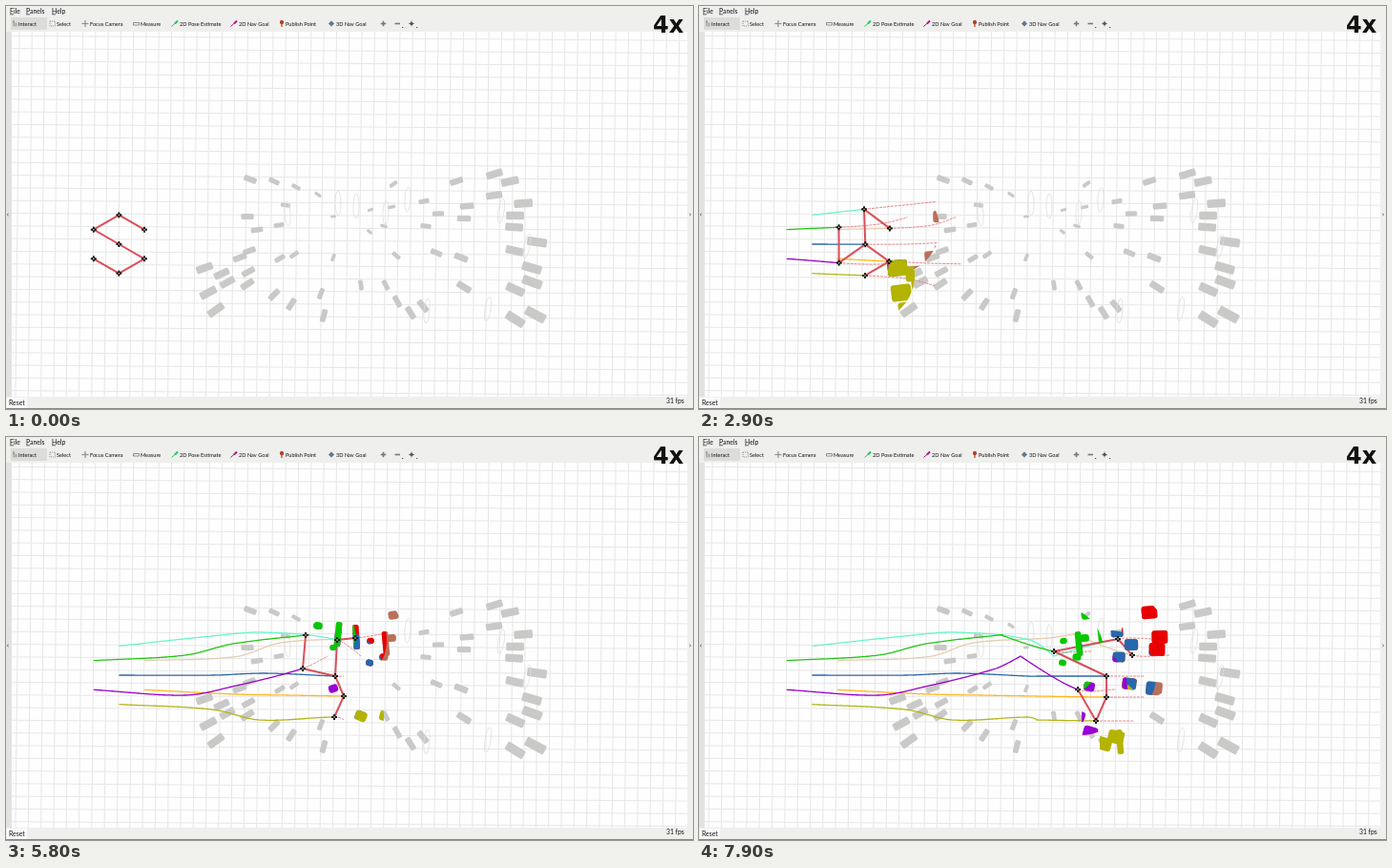
An HTML page with a canvas that plays this animation: 720 px wide and 423 px high, repeating every 8 s.

```html
<!DOCTYPE html>
<html>
<head>
<meta charset="utf-8">
<style>
html, body { margin: 0; width: 720px; height: 423px; overflow: hidden; }
canvas { display: block; }
</style>
</head>
<body>
<canvas id="stage" width="720" height="423"></canvas>
<script>
const LOOP = 8000, START = 1990, GOAL = 6250, PAUSE = 400, HORIZON = 1250;
const TIMES = [START, 3600, 4500, 5800, GOAL, 7500, 8300];
const REST = TIMES.indexOf(GOAL), RANGE = 48;
const PANEL = '#efefee', GRID = '#e7e7e8', GHOST = '#c9c9c8';

// Starting slot on a lattice, then the points passed at the inner TIMES.
function robot(trail, sight, col, row, ...points) {
  const [x, y] = points[points.length - 1];
  return { trail, sight, route: [[118.4 + 26.6 * col, 250 + 15.3 * row], ...points, [x + 40, y]] };
}

// Listed in painting order: later robots colour over earlier ones.
const robots = {
  E: robot('#ffb820', null, 1, 1, [241, 270], [295, 271], [354, 272], [354, 272], [427, 273]),
  C: robot('#e5cdb0', '#b9705a', 1, -1, [241, 230.5], [288, 216], [366, 211], [393, 207], [454, 229]),
  A: robot('#68f5cc', '#e80000', 0, -2, [215, 209], [269, 205], [347, 213], [372, 230], [439, 212]),
  D: robot('#2c67aa', '#2468ad', 0, 0, [217, 250], [271, 248], [345, 251], [354, 251], [427, 251]),
  G: robot('#b5b51c', '#b3b300', 0, 2, [216, 286], [266, 297], [344, 294], [354, 297], [416, 298]),
  F: robot('#9a00c8', '#9a00d4', -1, 1, [188, 271], [237, 262], [311, 243], [337, 230], [397, 265]),
  B: robot('#22c514', '#08c800', -1, -1, [188, 229], [238, 217], [314, 208], [317, 208], [372, 225])
};
const fleet = Object.values(robots);
const CHAIN = ['CA', 'AB', 'BD', 'DE', 'EG', 'GF'];
const FORK = ['CA', 'AD', 'DF', 'FB', 'DE', 'EG'];

const boxes = [
  [256,182], [281,184], [304,190], [327,198], [253,221], [263,235], [286,230], [293,209], [255,257],
  [245,264], [208,275], [226,281], [212,301], [232,290], [254,279], [253,292], [287,265], [302,261],
  [281,303], [299,313], [330,302], [333,325], [220,319], [343,264], [343,221], [372,293], [398,293],
  [381,237], [382,214], [406,187], [404,211], [396,231], [409,262], [438,205], [440,231], [410,310],
  [424,322], [437,315], [472,184], [483,210], [480,223], [453,218], [451,259], [477,264], [480,295]
];
const posts = [[295,218], [348,207], [367,210], [398,217], [421,203], [505,318], [441,320], [519,215], [546,252]];
// A fan of boxes at the far right of the map.
for (let i = 0; i < 13; i++) {
  const angle = -.28 + i * .07, r = 158 + 4.5 * i + 14 * Math.sin(i * 2.4);
  boxes.push([360 + r * Math.cos(angle), 220 + r * Math.sin(angle)]);
}

const ctx = stage.getContext('2d');

function line(points, color, width, dash = []) {
  ctx.strokeStyle = color;
  ctx.lineWidth = width;
  ctx.setLineDash(dash);
  ctx.beginPath();
  points.forEach(([x, y]) => ctx.lineTo(x, y));
  ctx.stroke();
  ctx.setLineDash([]);
}

function rect(x, y, w, h, color) {
  ctx.fillStyle = color;
  ctx.fillRect(x, y, w, h);
}

function block(x, y, w, h, angle, radius, color) {
  ctx.save();
  ctx.translate(x, y);
  ctx.rotate(angle);
  ctx.fillStyle = color;
  ctx.beginPath();
  ctx.roundRect(-w / 2, -h / 2, w, h, radius);
  ctx.fill();
  ctx.restore();
}

function text(str, x, y, size, font = 'Lato') {
  ctx.fillStyle = '#111';
  ctx.font = `${font === 'Lato' ? '' : 'bold '}${size}px "${font}", sans-serif`;
  ctx.fillText(str, x, y);
}

function plus(x, y, r, color, width) {
  line([[x - r, y], [x + r, y]], color, width);
  line([[x, y - r], [x, y + r]], color, width);
}

// Smooth curve through a route's points, coming to a stop at the resting one.
function position(route, time) {
  const last = TIMES.length - 1;
  const t = Math.max(START, Math.min(TIMES[last], time));
  let i = 0;
  while (i < last - 1 && t > TIMES[i + 1]) i++;
  const span = TIMES[i + 1] - TIMES[i], u = (t - TIMES[i]) / span;
  return [0, 1].map(axis => {
    const slope = k => {
      if (k === REST) return 0;
      const a = Math.max(0, k - 1), b = Math.min(last, k + 1);
      return (route[b][axis] - route[a][axis]) / (TIMES[b] - TIMES[a]) * span;
    };
    const p = route[i][axis], q = route[i + 1][axis], m = slope(i), n = slope(i + 1);
    return p + u * (m + u * (3 * (q - p) - 2 * m - n + u * (2 * (p - q) + m + n)));
  });
}

function stretch(route, from, to) {
  const points = [];
  for (let t = from; t < to; t += 30) points.push(position(route, t));
  points.push(position(route, to));
  return points;
}

// Seen from above, obstacles grow and smear away from the view centre.
const radial = (x, y) => Math.atan((y - 220) / (x - 360.5));
const size = (x, y) => 5 + .085 * Math.hypot(x - 360, y - 220);
const lean = x => (360 - x) / 120;

function drawMap() {
  rect(0, 0, 720, 423, '#fefefe');
  for (let i = -1; i < 54; i++) {
    const x = 12 + i * 13.3, y = 18 + i * 13.3;
    line([[x + 2, 27], [x - 2, 410]], GRID, 1);
    if (i < 30) line([[5, y], [715, y + 5]], GRID, 1);
  }
  for (const [x, y] of boxes) {
    const s = size(x, y);
    block(x, y, s * .95, s * .42, radial(x, y), 1.5, GHOST);
  }
  ctx.strokeStyle = '#dfdfdd';
  ctx.lineWidth = .8;
  for (const [x, y] of posts) {
    ctx.beginPath();
    ctx.ellipse(x, y, 3, 13, -lean(x) / 8, 0, 7);
    ctx.stroke();
  }
}

// A robot colours whatever lies in the half disc ahead of it.
function drawSight({ at: [x, y], sight }) {
  ctx.save();
  ctx.beginPath();
  ctx.arc(x + 4, y, RANGE, -Math.PI / 2, Math.PI / 2);
  ctx.clip();
  for (const [bx, by] of boxes) {
    const s = size(bx, by);
    block(bx, by, s * 1.1, s * .9, radial(bx, by) * .25, 3, sight);
  }
  for (const [px, py] of posts) block(px, py, 6.5, 26, Math.max(-.1, Math.min(.1, lean(px))), 2, sight);
  ctx.restore();
}

function drawChrome() {
  rect(0, 0, 720, 27, PANEL);
  rect(0, 410, 720, 13, PANEL);
  rect(0, 27, 6, 383, '#e2e2e0');
  rect(714, 27, 6, 383, PANEL);
  rect(0, 422, 720, 1, '#8a8a86');
  rect(5, 12, 38, 13, '#dcdcda');
  text('‹', 1, 221, 7);
  text('›', 716, 221, 7);

  [['File', 4], ['Panels', 21], ['Help', 48]].forEach(([label, x]) => {
    text(label, x, 7.5, 6.9);
    rect(x, 8.5, 4, .7, '#222');
  });
  [['Interact', 13], ['Select', 53], ['Focus Camera', 88], ['Measure', 141], ['2D Pose Estimate', 182],
   ['2D Nav Goal', 244], ['Publish Point', 293], ['3D Nav Goal', 346]]
    .forEach(([label, x]) => text(label, x, 20.7, 5.6));

  const ink = '#777';
  block(9.5, 19.5, 5, 4, 0, 1, '#b5b5b0');
  line([[8, 18], [8, 15]], ink, 1);
  line([[46, 16], [51.5, 16], [51.5, 21], [46, 21], [46, 16]], ink, .8, [1, 1]);
  plus(83, 18.5, 3.5, '#909090', 1.2);
  line([[133.5, 17.5], [139.5, 17.5], [139.5, 20], [133.5, 20], [133.5, 17.5]], ink, .8);
  for (const [x, color] of [[177, '#20cb55'], [239, '#b0188c']]) {
    line([[x - 3.5, 21.5], [x + 3, 15.5]], color, 1);
    line([[x, 18.5], [x + 3, 15.5]], color, 2);
  }
  block(289, 17, 4, 4.5, 0, 2, '#b64025');
  line([[289, 18], [289, 22]], '#b64025', 1.2);
  block(341, 18.5, 4.5, 4.5, Math.PI / 4, .5, '#65798d');
  plus(395.5, 18.5, 2.7, ink, 1.6);
  line([[407.5, 18.5], [413, 18.5]], ink, 1.6);
  plus(425, 18.5, 3, ink, .8);
  block(425, 18.5, 3.5, 3.5, 0, 2, '#555');
  rect(415, 22, 1.3, 1, '#555');
  rect(430, 22, 1.3, 1, '#555');

  text('4x', 678, 28, 24, 'DejaVu Sans');
  rect(1, 411, 21, 11, '#fafafa');
  text('Reset', 3, 419, 6.9);
  text('31 fps', 692, 417, 6.8);
}

function marker([x, y]) {
  plus(x, y, 3, '#17120b', 1.8);
  block(x, y, 3.6, 3.6, Math.PI / 4, 0, '#17120b');
  block(x, y, 1.4, 1.4, 0, 0, '#c9c9c0');
}

function draw(t) {
  const restart = GOAL + PAUSE, leaving = t > restart;
  const time = leaving ? t - PAUSE : Math.min(t, GOAL);
  const goal = leaving ? TIMES[REST + 2] : GOAL;
  fleet.forEach(r => r.at = position(r.route, time));

  drawMap();
  if (time > START) {
    for (const r of fleet) {
      line(stretch(r.route, START, time), r.trail, 1.3);
      line(stretch(r.route, time, Math.min(time + HORIZON, goal)), '#e07878', .9, [3, 1]);
    }
  }
  // The links change shortly after each departure.
  const edges = t > START + 400 && t < restart + 400 ? FORK : CHAIN;
  for (const [a, b] of edges) line([robots[a].at, robots[b].at], '#d9505a', 2);
  fleet.filter(r => r.sight).forEach(drawSight);
  fleet.forEach(r => marker(r.at));
  drawChrome();
}

function frame(now) {
  draw(now % LOOP);
  requestAnimationFrame(frame);
}
draw(0);
requestAnimationFrame(frame);
</script>
</body>
</html>
```
